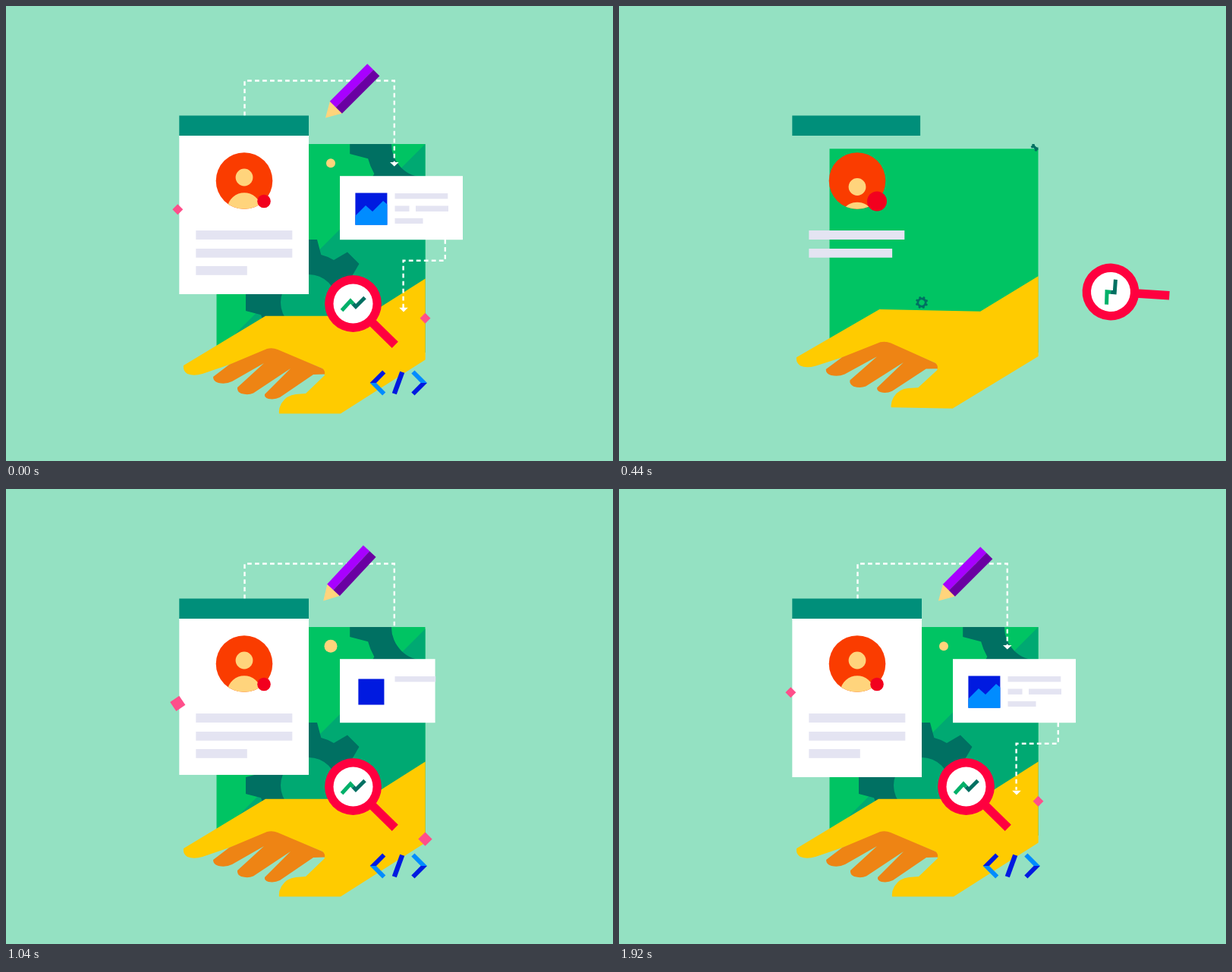
An HTML page with a canvas for the animation above (3.08 s loop, 800 px wide and 600 px high).

```html
<!DOCTYPE html>
<html lang="en">
<head>
<meta charset="utf-8">
<title>Hand and interface cards</title>
<style>
html, body { margin: 0; width: 100%; height: 100%; overflow: hidden; background: #94e1c2; }
canvas { display: block; }
</style>
</head>
<body>
<canvas id="stage" width="800" height="600"></canvas>
<script>
const ctx = document.getElementById('stage').getContext('2d');
const LOOP = 3080, STEP = 40;
const C = {
  bg: '#94e1c2', green: '#00c463', mid: '#00a972', gear: '#007062', header: '#008f7a',
  white: '#fff', bar: '#e4e4f2', avatar: '#fa3c00', skin: '#ffd47c', dot: '#f2001e',
  yellow: '#ffcb00', orange: '#ee8414', red: '#ff003f', navy: '#001ae0', blue: '#008cff',
  violet: '#a800ff', plum: '#6a00a2', pink: '#ff4f8b', leaf: '#00b069'
};
let t = 0;

// Timing helpers: the share of a move that is still to come
function left(start, tau) {
  if (t < start) return 1;
  const r = Math.exp((start - t) / tau);
  return r < 0.004 ? 0 : r;
}
const span = (a, b) => Math.min(1, Math.max(0, (t - a) / (b - a)));
const quadOut = (a, b) => 1 - (1 - span(a, b)) ** 2;

// Smooth curve through [time, value] keys
function track(time, keys) {
  const n = keys.length - 1;
  if (time <= keys[0][0]) return keys[0][1];
  if (time >= keys[n][0]) return keys[n][1];
  const slope = i => i <= 0 || i >= n ? 0
    : (keys[i + 1][1] - keys[i - 1][1]) / (keys[i + 1][0] - keys[i - 1][0]);
  let i = 0;
  while (time > keys[i + 1][0]) i++;
  const [t0, v0] = keys[i], [t1, v1] = keys[i + 1];
  const d = t1 - t0, u = (time - t0) / d, w = 1 - u;
  return v0 * (1 + 2 * u) * w * w + v1 * u * u * (3 - 2 * u)
    + d * u * w * (slope(i) * w - slope(i + 1) * u);
}

// Drawing helpers
function rect(x, y, w, h, color) {
  if (w <= 0 || h <= 0) return;
  ctx.fillStyle = color;
  ctx.fillRect(x, y, w, h);
}
function disc(x, y, r, color) {
  if (r <= 0) return;
  ctx.fillStyle = color;
  ctx.beginPath();
  ctx.arc(x, y, r, 0, 7);
  ctx.fill();
}
function poly(points, color) {
  ctx.fillStyle = color;
  ctx.beginPath();
  points.forEach(p => ctx.lineTo(p[0], p[1]));
  ctx.fill();
}
function shape(path, color) {
  ctx.fillStyle = color;
  ctx.fill(new Path2D(path));
}
function group(x, y, deg, scale, draw) {
  if (scale <= 0) return;
  ctx.save();
  ctx.translate(x, y);
  ctx.rotate(deg * Math.PI / 180);
  ctx.scale(scale, scale);
  draw();
  ctx.restore();
}
function clipped(path, draw) {
  ctx.save();
  ctx.clip(new Path2D(path));
  draw();
  ctx.restore();
}
const bar = (x, y, w, h, start, tau) =>
  rect(x, y, w * (1 - left(start, tau)), h, C.bar);

function gear(x, y, size, turn) {
  const p = quadOut(410, 1000);
  group(x, y, turn * (1 - p), size * p, () => {
    const edge = 14.5 * Math.PI / 180, tip = Math.atan2(11, 83), r = Math.hypot(11, 83);
    ctx.beginPath();
    for (let i = 0; i < 8; i++) {
      const a = i * Math.PI / 4;
      ctx.arc(0, 0, 65, a - Math.PI / 4 + edge, a - edge);
      ctx.lineTo(r * Math.cos(a - tip), r * Math.sin(a - tip));
      ctx.lineTo(r * Math.cos(a + tip), r * Math.sin(a + tip));
      ctx.lineTo(65 * Math.cos(a + edge), 65 * Math.sin(a + edge));
    }
    ctx.closePath();
    ctx.moveTo(37, 0);
    ctx.arc(0, 0, 37, 0, 7);
    ctx.fillStyle = C.gear;
    ctx.fill('evenodd');
  });
}

function panel() {
  const top = 182 + 275 * left(250, 50);
  if (t < 250) return;
  clipped(`M277.5 ${top}H552.5V457H277.5Z`, () => {
    rect(277, 182, 276, 275, C.green);
    const sum = 734.5 + 275 * left(480, 120);
    poly([[sum - 182, 182], [sum + 100, 182], [sum + 100, 457], [sum - 457, 457]], C.mid);
  });
  clipped('M277.5 182H552.5V457H277.5Z', () => {
    gear(552, 182, 1.19, 70);
    gear(399, 391, 1, -72);
  });
}

function hand() {
  if (t < 160) return;
  const r = 1 - span(160, 520);
  clipped('M0 0H552.7V600H0Z', () => {
    group(342 + 512 * r ** 4, 409 - 176 * r * r, 23 * r * r, 1, () => {
      ctx.translate(-342, -409);
      shape('M234 474L342 408.7H475L952 106V212L441 537.5H360Q359 531 363 524' +
        'Q370 513 382 512L395 511L420 487L417 478L352 452L297 472L259 485' +
        'Q247 488.500 239 485Q233 481 234 474Z', C.yellow);
      shape('M273 489L294 473L344 452Q351 450 358 453L417 478Q421 481 420 485.500' +
        'L405 486L361 516Q354 519.500 346 518Q340 516 341 512L375 478L326 510.500' +
        'Q319 513.500 310 511Q304 508 305 503L340 471L298 495Q290 499 280 497' +
        'Q273 495 273 489Z', C.orange);
    });
  });
}

function profile() {
  rect(228.3, 171, 170.7, 209 * (1 - left(651, 92)), C.white);
  rect(228.3, 144.5, 170.7 * (1 - left(170, 60)), 26.5, C.header);
  const r = 37.3 * (1 - (1 - span(140, 280)) ** 3);
  disc(314, 230.5, r, C.avatar);
  const drop = 56 * left(350, 60);
  if (t >= 350) clipped('M276.7 230.5a37.3 37.3 0 1 0 74.6 0a37.3 37.3 0 1 0 -74.6 0', () => {
    disc(314, 226 + drop, 11.4, C.skin);
    shape(`M291 ${268 + drop}C295 ${239 + drop} 333 ${239 + drop} 337 ${268 + drop}Z`, C.skin);
  });
  disc(340, 257.5, track(t, [[240, 0], [280, 9.5], [360, 15], [440, 13], [600, 8.8]]), C.dot);
  bar(250.3, 296, 127, 12, 222, 45);
  bar(250.3, 320, 127, 11.8, 320, 60);
  bar(250.3, 343, 67.5, 11.8, 445, 90);
}

// Dashed route that grows along its points
function route(points, start) {
  if (t < start) return;
  const legs = points.slice(1).map((p, i) => Math.hypot(p[0] - points[i][0], p[1] - points[i][1]));
  let rest = legs.reduce((a, b) => a + b) * (1 - left(start, 180));
  ctx.strokeStyle = C.white;
  ctx.lineWidth = 2.4;
  ctx.setLineDash([5.8, 4.2]);
  ctx.beginPath();
  ctx.moveTo(...points[0]);
  for (let i = 0; i < legs.length && rest > 0; i++) {
    const k = Math.min(1, rest / legs[i]), [a, b] = points[i], [c, d] = points[i + 1];
    ctx.lineTo(a + (c - a) * k, b + (d - b) * k);
    rest -= legs[i];
  }
  ctx.stroke();
  ctx.setLineDash([]);
}
function arrow(x, y, start) {
  group(x, y, 0, quadOut(start, start + 160),
    () => poly([[-5.8, 0], [5.8, 0], [0, 5.6]], C.white));
}

function pencil() {
  const r = left(600, 105) * 40 / Math.exp(-160 / 105);
  group(421 - r, 147.5, -45 - r * 0.73, quadOut(640, 760), () => {
    poly([[0, 0], [20, -11.4], [20, 11.4]], C.skin);
    rect(19.5, -11.4, 70, 11.5, C.violet);
    rect(19.5, 0, 70, 11.4, C.plum);
  });
}

function imageCard() {
  rect(440, 224.2, 162 * (1 - left(928, 75)), 84, C.white);
  group(481.4, 267.5, 0, 1 - left(940, 60), () => rect(-21, -21, 42, 42, C.navy));
  if (t > 1190) clipped('M460.4 246.5H502.4V288.5H460.4Z', () => {
    const d = 34 * left(1190, 100);
    poly([[460, 277], [474, 263], [483, 271], [497, 257], [503, 262], [503, 290], [460, 290]]
      .map(([x, y]) => [x, y + d]), C.blue);
    rect(460, 288 + d, 43, 2, C.blue);
  });
  bar(512.5, 247, 69.8, 7.3, 930, 75);
  bar(512.5, 263.5, 19, 7.4, 1110, 45);
  bar(540, 263.5, 43, 7.4, 1190, 75);
  bar(512.5, 279.8, 37, 7.2, 1290, 75);
}

function lens() {
  if (t < 400) return;
  const keys = [
    [400, 666, 364, -3], [440, 648, 377, 4], [580, 552, 482, 66],
    [760, 476, 402.5, 59], [920, 457.5, 392.5, 46], [1040, 457.5, 392.5, 45]
  ];
  const at = i => track(t, keys.map(k => [k[0], k[i]]));
  group(at(1), at(2), at(3) - 45, 1, () => {
    group(0, 0, 44.5, 1, () => rect(30, -5.8, 47.5, 11.6, C.red));
    disc(0, 0, 37.4, C.red);
    disc(0, 0, 26, C.white);
    ctx.lineWidth = 5;
    const line = (color, pts) => {
      ctx.strokeStyle = color;
      ctx.beginPath();
      pts.forEach(p => ctx.lineTo(...p));
      ctx.stroke();
    };
    line(C.leaf, [[-15, 9], [-3.5, -3.5], [0, 0.2]]);
    line(C.gear, [[0, 0.2], [3.5, 4], [15.5, -8]]);
  });
}

function codeSign() {
  const pop = delay => track(t - delay, [[520, 0], [600, 0.75], [680, 1.15], [760, 1.04], [880, 1]]);
  const arm = (dir, color) =>
    poly([[-10.2, 0], [6.3, 16.5 * dir], [10.5, 12.5 * dir], [-1.8, 0]], color);
  group(489.8, 497, 0, pop(-40), () => { arm(1, C.blue); arm(-1, C.navy); });
  group(517, 497, 0, pop(-20),
    () => poly([[2.2, -15.2], [8.2, -13.2], [-2.2, 15.2], [-8.2, 13.2]], C.navy));
  group(544.8, 497, 180, pop(0), () => { arm(1, C.blue); arm(-1, C.navy); });
}

function spark(x, y, start) {
  const s = t - start;
  if (s < 0) return;
  const q = s >= 920 ? 0 : (Math.exp(-s / 200) - 0.01) / 0.99;
  const side = track(s, [[-40, 0], [0, 6.5], [40, 13], [130, 23], [280, 14.5], [520, 10.6], [760, 9.8]]);
  group(x, y + 61 * q, 45 - 330 * q, 1, () => rect(-side / 2, -side / 2, side, side, C.pink));
}

function draw() {
  rect(0, 0, 800, 600, C.bg);
  panel();
  hand();
  route([[314.5, 145], [314.5, 98.5], [511.8, 98.5], [511.8, 206]], 570);
  arrow(511.8, 206, 1290);
  profile();
  pencil();
  disc(428, 207.3, track(t, [[920, 0], [960, 5], [1040, 8.5], [1160, 7.2], [1280, 6]]), C.skin);
  imageCard();
  route([[578.8, 308], [578.8, 335.8], [523.6, 335.8], [523.6, 398]], 1070);
  arrow(524, 397.8, 1760);
  lens();
  codeSign();
  spark(226.3, 268.3, 760);
  spark(552.5, 411.8, 1000);
}

const began = performance.now();
function tick() {
  const now = Math.max(0, performance.now() - began) % LOOP;
  t = Math.floor(now / STEP) * STEP;
  // The loop opens on the finished picture
  if (t < STEP) t = LOOP;
  draw();
  requestAnimationFrame(tick);
}
tick();
</script>
</body>
</html>
```
